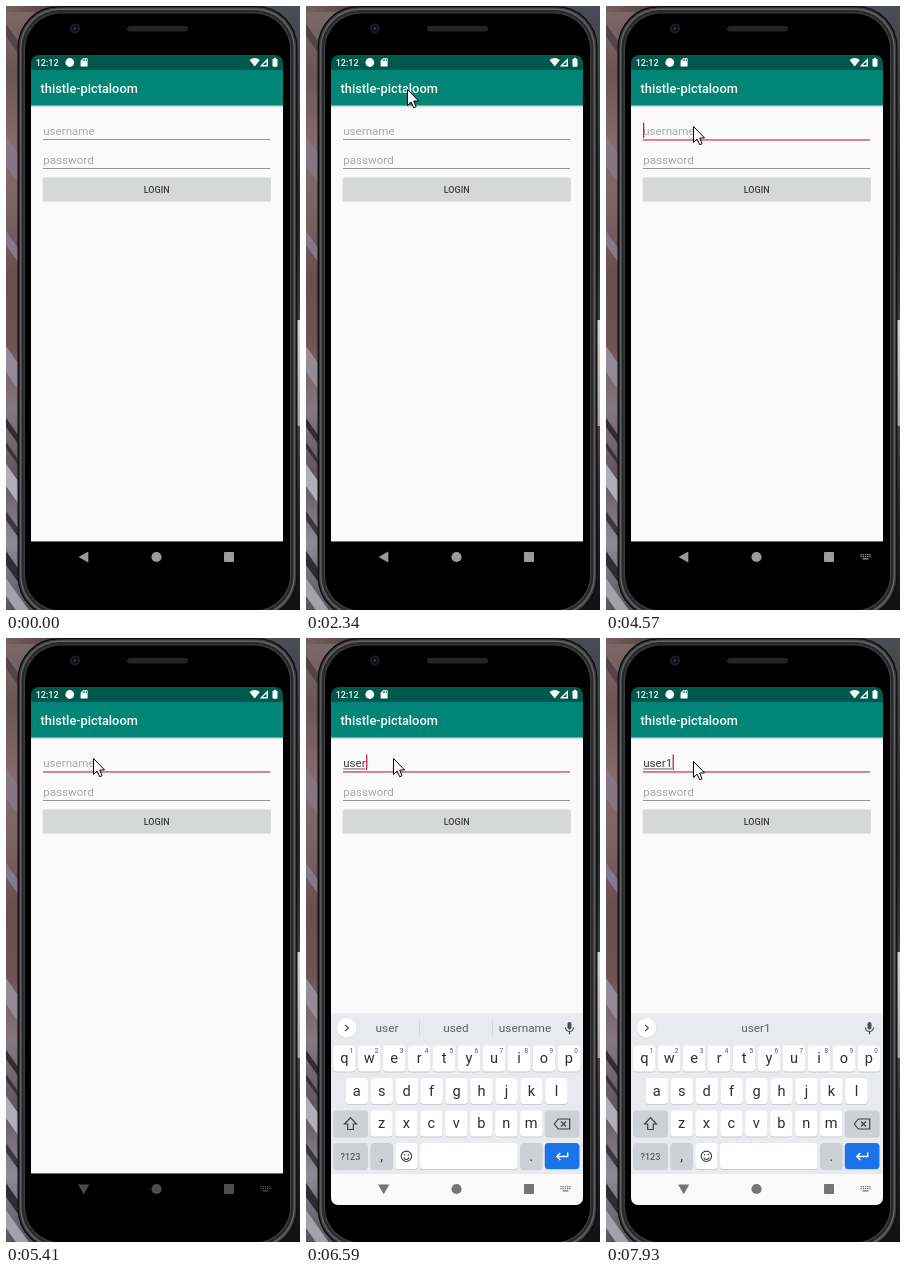
An HTML page with a canvas that plays this animation: 294 by 604 pixels, repeating every 8 s.

```html
<!DOCTYPE html>
<html lang="en">
<head>
<meta charset="utf-8">
<title>Login screen</title>
<style>
html, body { margin: 0; width: 100%; height: 100%; overflow: hidden; background: #000; }
canvas { display: block; width: 294px; height: 604px; }
</style>
</head>
<body>
<canvas id="stage"></canvas>
<script>
const W = 294, H = 604, LOOP = 8000;
const canvas = document.getElementById('stage');
const dpr = window.devicePixelRatio || 1;
canvas.width = W * dpr;
canvas.height = H * dpr;
const c = canvas.getContext('2d');

// Pointer path: time, x, y
const POINTER = [
  [1210, 218, 599], [1330, 217, 596], [1490, 212, 585], [1640, 206, 570],
  [1760, 196, 543], [1880, 182, 503], [2040, 178, 326], [2340, 101, 83],
  [2490, 101, 79], [2610, 99, 78], [2730, 92, 104], [2850, 88, 120],
  [3000, 87, 120], [7930, 87, 123]
];
const TYPED = [[6110, 'u'], [6230, 'us'], [6350, 'use'], [6470, 'user'], [7430, 'user1']];
const CARET = [[3150, 4010], [4570, 4880], [5960, 7020], [7430, LOOP]];
const KEYBOARD_AT = 5960;

const latest = (steps, t) => steps.filter(s => s[0] <= t).pop();

function rect(x, y, w, h, fill) {
  c.fillStyle = fill;
  c.fillRect(x, y, w, h);
}

function round(x, y, w, h, r, fill) {
  c.beginPath();
  c.roundRect(x, y, w, h, r);
  c.fillStyle = fill;
  c.fill();
}

function disc(x, y, r, fill) {
  c.beginPath();
  c.arc(x, y, r, 0, Math.PI * 2);
  c.fillStyle = fill;
  c.fill();
}

function ring(x, y, r, color, width) {
  c.beginPath();
  c.arc(x, y, r, 0, Math.PI * 2);
  c.strokeStyle = color;
  c.lineWidth = width;
  c.stroke();
}

function trace(points) {
  c.beginPath();
  for (let i = 0; i < points.length; i += 2) c.lineTo(points[i], points[i + 1]);
}

function poly(points, fill) {
  trace(points);
  c.closePath();
  c.fillStyle = fill;
  c.fill();
}

function line(points, color, width = 1.2) {
  trace(points);
  c.strokeStyle = color;
  c.lineWidth = width;
  c.stroke();
}

function text(str, x, y, size, color, align = 'left', weight = 400) {
  c.font = `${weight} ${size}px Roboto, "Liberation Sans", sans-serif`;
  c.textAlign = align;
  c.fillStyle = color;
  c.fillText(str, x, y);
  return c.measureText(str).width;
}

function gradient(x0, y0, x1, y1, colors) {
  const g = c.createLinearGradient(x0, y0, x1, y1);
  colors.forEach((color, i) => g.addColorStop(i / (colors.length - 1), color));
  return g;
}

// Slanted streak along the left edge
function streak(y, h, color) {
  poly([0, y, 24, y + 34, 24, y + 34 + h, 0, y + h], color);
}

function drawBackdrop() {
  rect(0, 0, W, H, gradient(0, 0, 0, H,
    ['#7d696b', '#6b5558', '#846a6c', '#7b6468', '#6a4f51', '#6e5354', '#857880', '#5f555b', '#8d8b95', '#55535a']));
  rect(0, 0, W, 6, gradient(0, 0, W, 0, ['#75605f', '#2c2729', '#302f33', '#4a4d55']));
  streak(18, 12, '#55434a');
  streak(130, 30, '#857681');
  streak(225, 14, '#84788a');
  streak(340, 26, '#948b97');
  streak(412, 9, '#332c31');
  streak(436, 6, '#3b353a');
  streak(458, 22, '#b0afb8');
  streak(505, 9, '#3a373c');
  streak(545, 14, '#2f2d32');
  streak(572, 18, '#a3a2aa');
  rect(258, 0, 36, 314, gradient(0, 0, 0, 314, ['#4a4d55', '#3b3b40', '#27272a', '#3f3d40']));
  rect(284, 314, 10, 106, gradient(0, 314, 0, 420, ['#d8d4d3', '#a8a09e']));
  rect(258, 420, 36, 184, gradient(0, 420, 0, H, ['#4c4547', '#252427', '#111113']));
}

function drawBody() {
  const layers = [[0, '#0c0c0d'], [1.3, '#3a3a3c'], [2.6, '#626265'], [4, '#29292b'], [6.2, '#3a3a3c'], [7.5, '#000']];
  for (const [inset, fill] of layers) {
    round(11.5 + inset, inset, 280 - inset * 2, 612 - inset * 2, 41 - inset * 0.7, fill);
  }
  disc(69, 22.5, 5, '#1d1e21');
  disc(69, 22.5, 3, '#0b0d13');
  disc(69, 22.5, 1.4, '#2c3550');
  round(121, 20, 61, 5.5, 2.7, '#242425');
}

function drawStatus() {
  rect(25, 49, 252, 16, '#00574b');
  text('12:12', 29.7, 60, 9, '#fff', 'left', 500);
  disc(63.8, 56.5, 4.4, '#fff');
  poly([77, 52.3, 81.6, 52.3, 81.6, 60.5, 74.6, 60.5, 74.6, 54.8], '#fff');
  for (let i = 0; i < 3; i++) rect(76.8 + i * 1.6, 53.3, 0.8, 1.8, '#00574b');
  c.beginPath();
  c.moveTo(248.7, 60.5);
  c.lineTo(243.5, 54);
  c.quadraticCurveTo(248.7, 50.2, 253.9, 54);
  c.fillStyle = '#fff';
  c.fill();
  poly([262, 52, 262, 60.5, 253.7, 60.5], '#fff');
  poly([260.5, 55.4, 260.5, 59.1, 256.9, 59.1], '#00574b');
  round(266.5, 52.8, 5, 7.9, 0.8, '#fff');
  rect(268, 51.8, 2, 1.2, '#fff');
}

function drawPage(t) {
  rect(25, 65, 252, 471, '#fafafa');
  rect(25, 99, 252, 4, gradient(0, 99, 0, 103, ['#9fbdb8', '#ececec', '#fafafa']));
  rect(25, 64, 252, 35.4, '#008577');
  text('thistle-pictaloom', 34.6, 87.3, 12.8, '#fff', 'left', 500);

  const typed = latest(TYPED, t);
  let width = 0;
  if (typed) {
    width = text(typed[1], 37.2, 129, 11.6, '#3c3c3c');
    const marked = t >= 7430 && t < 7680 ? width - 6.5 : width;
    rect(37.2, 130.5, marked, 0.9, '#555');
  } else {
    text('username', 37.2, 129, 11.6, '#a9a9a9');
  }
  text('password', 37.2, 158, 11.6, '#a9a9a9');

  if (t >= 3150) rect(37, 133.3, 227, 1.3, '#cf3c68');
  else rect(37, 133, 227, 1, '#939393');
  rect(37, 162, 227, 1, '#939393');
  if (CARET.some(([on, off]) => t >= on && t < off)) {
    rect(37 + width + (width ? 0.6 : 0), 116.5, 1.3, 15.5, '#d81b60');
  }

  round(36.8, 171.8, 228, 24, 1.5, '#e2e3e3');
  round(36.8, 171.4, 228, 23.8, 1.5, '#d6d7d7');
  text('LOGIN', 150.7, 186.8, 9, '#404040', 'center', 500);
}

function drawNav(t) {
  const open = t >= KEYBOARD_AT;
  rect(25, 536, 252, 31, open ? '#fafafa' : '#000');
  if (!open) rect(25, 535, 252, 1, '#5f776f');
  const color = open ? '#757575' : t < 5160 ? '#9b9b9b' : t < 5410 ? '#7c7c7c' : '#4d4d4d';
  c.save();
  c.translate(77.7, 551);
  c.rotate(t < 4730 ? 0 : t < 4880 ? -Math.PI / 4 : -Math.PI / 2);
  poly([-5.2, 0, 4.6, -5.6, 4.6, 5.6], color);
  c.restore();
  disc(150.5, 551, 5.1, color);
  round(218, 546, 10, 10, 0.8, color);
  if (t < 3580) return;
  for (let row = 0; row < 2; row++) {
    for (let i = 0; i < 5; i++) rect(254.4 + i * 2.2, 548 + row * 2, 1.4, 1.2, color);
  }
  rect(256.6, 552.2, 5.8, 1.3, color);
}

function drawKey(x, y, w, fill = '#fff') {
  round(x, y + 1, w, 26, 3.5, '#c9ccd0');
  round(x, y, w, 26, 3.5, fill);
}

function drawMic() {
  const ink = '#4a4d52';
  round(261.5, 384, 4, 7.5, 2, ink);
  c.beginPath();
  c.arc(263.5, 389.5, 4, 0, Math.PI);
  c.strokeStyle = ink;
  c.lineWidth = 1.2;
  c.stroke();
  rect(262.9, 393.3, 1.2, 3, ink);
}

function drawTools() {
  const ink = '#5f6368';
  ring(72.8, 388.8, 3.5, ink, 1.3);
  line([75.4, 391.4, 79, 395], ink, 1.4);

  trace([105, 385.3, 115, 385.3, 115, 391.8, 111.8, 395, 105, 395]);
  c.closePath();
  c.strokeStyle = ink;
  c.lineWidth = 1.2;
  c.stroke();
  line([111.8, 395, 111.8, 391.8, 115, 391.8], ink, 1);
  disc(108, 388.5, 0.8, ink);
  disc(112, 388.5, 0.8, ink);
  c.beginPath();
  c.arc(109.7, 390.3, 2, 0.2, Math.PI - 0.2);
  c.stroke();

  text('GIF', 145.7, 393.3, 9, ink, 'center', 700);

  c.strokeRect(178, 385.5, 8.6, 9.8);
  rect(180, 384.3, 4.6, 2.8, ink);
  for (const y of [389, 391, 393]) rect(180, y, y > 392 ? 3 : 4.6, 0.9, ink);

  rect(204, 382, 0.8, 16, '#cfd2d6');
  for (const x of [223.3, 227.3, 231.3]) disc(x, 390, 1.2, ink);
}

function drawStrip(t) {
  const collapsed = t >= 6350;
  disc(40.7, 390.8, 10, '#d7dade');
  disc(40.7, 390, 9.7, '#fff');
  const d = collapsed ? 1 : -1;
  line([40.7 - d * 1.6, 386.8, 40.7 + d * 1.6, 390, 40.7 - d * 1.6, 393.2], '#4a4d52', 1.2);
  drawMic();
  if (!collapsed) {
    drawTools();
  } else if (t < 7680) {
    ['user', 'used', 'username'].forEach((word, i) =>
      text(word, 81 + i * 69, 394.3, 11.8, '#5f6368', 'center'));
    rect(113, 382, 0.8, 16, '#cfd2d6');
    rect(186, 382, 0.8, 16, '#cfd2d6');
  } else {
    text('user1', 150, 394.3, 11.8, '#5f6368', 'center');
  }
}

function drawLetters(letters, x, y) {
  [...letters].forEach((ch, i) => {
    const mid = x + i * 24.95;
    drawKey(mid - 11.1, y, 22.2);
    text(ch, mid, y + 17.6, 14.6, '#2b2d30', 'center');
  });
}

function drawKeyboard(t) {
  const gray = '#cdd0d5', ink = '#3c4043';
  rect(25, 375.5, 252, 160.5, '#e8eaed');
  drawStrip(t);

  drawLetters('qwertyuiop', 38.3, 407.5);
  [...'1234567890'].forEach((n, i) => text(n, 45.6 + i * 24.95, 415, 6.4, '#4c5055', 'center'));
  drawLetters('asdfghjkl', 50.8, 440);
  drawLetters('zxcvbnm', 75.5, 472.5);

  drawKey(27.2, 472.5, 34.6, gray);
  trace([44.5, 479.7, 50.5, 486, 47.3, 486, 47.3, 491.5, 41.7, 491.5, 41.7, 486, 38.5, 486]);
  c.closePath();
  c.strokeStyle = ink;
  c.lineWidth = 1.2;
  c.stroke();

  drawKey(238.8, 472.5, 34.6, gray);
  trace([248.3, 486, 252.3, 481, 263.7, 481, 263.7, 491, 252.3, 491]);
  c.closePath();
  c.stroke();
  line([255, 483.5, 260, 488.5], ink);
  line([260, 483.5, 255, 488.5], ink);

  const y = 505;
  drawKey(27.2, y, 34.6, gray);
  text('?123', 44.5, y + 17, 9.2, ink, 'center');
  drawKey(64.6, y, 22.2, gray);
  text(',', 75.7, y + 18, 14, ink, 'center');
  drawKey(89.3, y, 22.2);
  ring(100.4, y + 13.3, 5.2, ink, 1.1);
  disc(98.5, y + 11.8, 0.8, ink);
  disc(102.3, y + 11.8, 0.8, ink);
  c.beginPath();
  c.arc(100.4, y + 13.8, 2.7, 0.2, Math.PI - 0.2);
  c.stroke();
  drawKey(114, y, 97.5);
  drawKey(214.2, y, 22.2, gray);
  text('.', 225.3, y + 18, 14, ink, 'center');
  drawKey(238.8, y, 34.6, '#1a73e8');
  line([261.7, y + 9.5, 261.7, y + 13.5, 251, y + 13.5], '#fff', 1.4);
  line([254.3, y + 10, 250.8, y + 13.5, 254.3, y + 17], '#fff', 1.4);
}

function drawPointer(t) {
  const at = latest(POINTER, t);
  if (!at) return;
  c.save();
  c.translate(at[1] + 0.5, at[2] + 0.5);
  trace([0, 0, 0, 16, 3.6, 12.6, 6.2, 18.2, 8.6, 17.2, 6.2, 11.6, 11, 11.4]);
  c.closePath();
  c.fillStyle = '#fff';
  c.fill();
  c.strokeStyle = '#000';
  c.lineWidth = 1;
  c.stroke();
  c.restore();
}

function draw(t) {
  c.setTransform(dpr, 0, 0, dpr, 0, 0);
  drawBackdrop();
  drawBody();
  c.save();
  c.beginPath();
  c.roundRect(25, 49, 252, 518, [8, 8, 7, 7]);
  c.clip();
  drawStatus();
  drawPage(t);
  if (t >= KEYBOARD_AT) drawKeyboard(t);
  drawNav(t);
  c.restore();
  drawPointer(t);
}

const start = performance.now();
function tick() {
  draw((performance.now() - start) % LOOP);
  requestAnimationFrame(tick);
}
tick();
</script>
</body>
</html>
```
